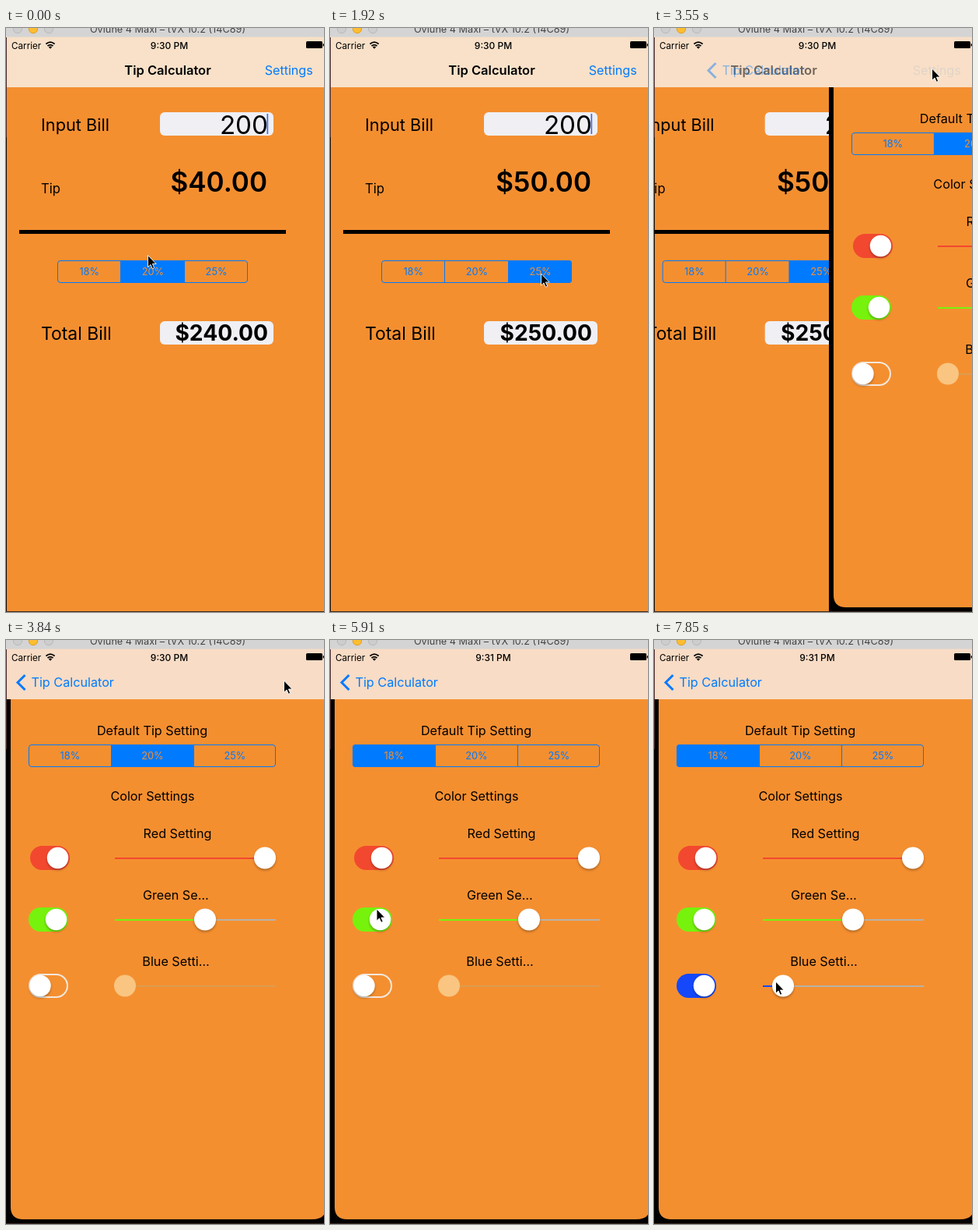
Recreate the animation shown at these times as an HTML page. Size 409x749 px, loop 7990 ms.

```html
<!DOCTYPE html>
<html lang="en">
<head>
<meta charset="utf-8">
<title>Tip Calculator</title>
<style>
  html, body { margin: 0; width: 100%; height: 100%; overflow: hidden; background: #f48f30; }
  svg { display: block; width: 409px; height: 749px; font-family: Inter, Roboto, sans-serif; }
  .raised { filter: drop-shadow(0 2px 1.5px rgba(0, 0, 0, .28)); }
</style>
</head>
<body>
<svg id="stage" viewBox="0 0 409 749"></svg>
<script>
const LOOP = 7990, STEP = 147.9;
const BLUE = '#007aff', ORANGE = '#f48f30';
const stage = document.getElementById('stage');

// Pointer stops: step, x, y
const pointerStops = [
  [0, 182.5, 291.5], [1, 160, 300], [2, 120, 311], [3, 107, 314], [4, 107, 314],
  [5, 125, 314], [7, 235, 314], [8, 264, 314], [9, 271.5, 315], [14, 271.5, 315],
  [15, 280, 280], [17, 335, 80], [18, 348, 46], [19, 356, 51], [20, 357.5, 52],
  [27, 357.5, 52], [28, 320, 72], [30, 160, 130], [31, 108, 140], [32, 91, 143],
  [35, 89.5, 143], [36, 88, 155], [38, 72, 245], [39, 67, 288], [40, 60, 345],
  [42, 48, 436], [44, 44, 451], [48, 44, 451], [50, 115, 444], [51, 144, 439], [53, 156.5, 438]
];

function pointerAt(step) {
  const i = pointerStops.findIndex(s => s[0] >= step);
  const b = pointerStops[i], a = pointerStops[Math.max(0, i - 1)];
  const f = b === a ? 0 : (step - a[0]) / (b[0] - a[0]);
  return [a[1] + (b[1] - a[1]) * f, a[2] + (b[2] - a[2]) * f];
}

const text = (x, y, size, str, { anchor = 'start', weight = 400, fill = '#000' } = {}) =>
  `<text x="${x}" y="${y}" font-size="${size}" text-anchor="${anchor}" font-weight="${weight}" fill="${fill}">${str}</text>`;

const rect = (x, y, w, h, fill, r = 0, extra = '') =>
  `<rect x="${x}" y="${y}" width="${w}" height="${h}" rx="${r}" fill="${fill}" ${extra}/>`;

const circle = (x, y, r, fill, extra = '') =>
  `<circle cx="${x}" cy="${y}" r="${r}" fill="${fill}" ${extra}/>`;

const group = (content, dx = 0, opacity = 1) =>
  `<g transform="translate(${dx})" opacity="${opacity}">${content}</g>`;

function segments(x, y, width, selected, pressed) {
  const w = width / 3, id = `seg${width}`;
  const edge = i => Math.floor(x + w * i);
  let fills = '', lines = '', labels = '';
  ['18%', '20%', '25%'].forEach((label, i) => {
    const left = edge(i), span = edge(i + 1) - left;
    if (i === selected) fills += rect(left, y, span, 29, BLUE);
    else if (i === pressed) fills += rect(left, y, span, 29, '#d68c2c');
    if (i) lines += rect(left, y, 1, 29, BLUE);
    labels += text(x + w * (i + .5) + .4, y + 19, 12.8, label,
      { anchor: 'middle', fill: i === selected ? ORANGE : BLUE });
  });
  return `<clipPath id="${id}">${rect(x, y, width, 29, '#000', 4)}</clipPath>
    <g clip-path="url(#${id})">${fills}${lines}</g>
    ${rect(x + .5, y + .5, width - 1, 28, 'none', 3.5, `stroke="${BLUE}"`)}${labels}`;
}

function toggle(x, y, color, on) {
  const body = on
    ? rect(x, y, 51, 31, color, 15.5)
    : rect(x + 1, y + 1, 49, 29, 'none', 14.5, 'stroke="#f3e8de" stroke-width="2"');
  return body + circle(x + 15 + 20.5 * on, y + 15.5, 13.7, '#fff', 'class="raised"');
}

function slider(y, thumb, color, enabled = true) {
  return rect(140, y - .5, 207, 2, enabled ? '#b7b2aa' : '#dc9c4f')
    + rect(140, y - .5, thumb - 140, 2, color)
    + circle(thumb, y, 14, enabled ? '#fff' : '#f9c581', enabled ? 'class="raised"' : '');
}

function billScreen(step) {
  const selected = step < 4 ? 1 : step < 12 ? 0 : 2;
  const pressed = step === 3 ? 0 : step === 11 ? 2 : -1;
  const tip = 200 * [.18, .2, .25][selected];
  const blink = (step + .5) % 6.75;
  const caretOn = step < 22 && (blink < 1.4 || blink > 4.4);
  const end = { anchor: 'end' };
  return rect(0, 76, 409, 673, ORANGE)
    + text(45, 131.5, 21.7, 'Input Bill')
    + rect(198, 108, 146, 30, '#efeff4', 6)
    + text(337, 135.5, 33.2, '200', end)
    + (caretOn ? rect(335.5, 110, 1.7, 26, '#3b6bf0') : '')
    + text(45, 212, 16.6, 'Tip')
    + text(336, 210, 35, '$' + tip.toFixed(2), { ...end, weight: 600 })
    + rect(17, 259, 343, 5, '#000')
    + segments(66, 298, 245, selected, pressed)
    + text(45, 400, 22.9, 'Total Bill')
    + rect(198, 376, 146, 30, '#efeff4', 6)
    + text(337, 401, 28.2, '$' + (200 + tip).toFixed(2), { ...end, weight: 700 });
}

function settingsScreen(step) {
  const blueOn = step < 47 ? 0 : step === 47 ? .57 : 1;
  const thumb = step < 52 ? 153 : step === 52 ? 160 : 166;
  const middle = { anchor: 'middle' };
  const pressed = step === 33 || step === 34 ? 0 : -1;
  return rect(0, 76, 409, 673, '#000')
    + `<path d="M6 76V727Q6 743 22 743H393Q405 743 409 737V76Z" fill="${ORANGE}"/>`
    + text(188, 122, 16.2, 'Default Tip Setting', middle)
    + segments(29, 134, 318, step < 35 ? 1 : 0, pressed)
    + text(188.5, 206, 16.2, 'Color Settings', middle)
    + text(220.5, 254, 16.2, 'Red Setting', middle)
    + toggle(31, 264, '#f2482f', 1) + slider(279.5, 333, '#f2482f')
    + text(218.3, 333, 16.2, 'Green Se…', middle)
    + toggle(29, 343, '#76f20c', 1) + slider(358.5, 256, '#76f20c')
    + text(218.5, 418, 16.2, 'Blue Setti…', middle)
    + toggle(29, 428, blueOn < 1 ? '#4465f8' : '#1548fb', blueOn)
    + slider(443.5, thumb, blueOn ? '#1548fb' : '#dc9c4f', blueOn > 0);
}

function navBar(step, push) {
  const title = text(208, 60, 16.5, 'Tip Calculator', { anchor: 'middle', weight: 600 });
  const settings = text(394.7, 60, 16.1, 'Settings', { anchor: 'end', fill: step < 21 ? BLUE : '#cbcbcb' });
  const back = `<path d="M24.5 45L15 54.5L24.5 64" fill="none" stroke="${BLUE}" stroke-width="3"/>`
    + text(32.5, 60, 16.2, 'Tip Calculator', { fill: BLUE });
  return rect(0, 11, 409, 65, '#f8e1c8')
    + group(rect(0, 11, 409, 65, '#f8dcc5'), 0, push)
    + group(title, -120 * push, 1 - push)
    + group(settings, 0, 1 - push)
    + group(back, 100 * (1 - push), push);
}

function statusBar(step) {
  const arc = (r, y) => `<path d="M${57 - r} ${y}Q57 ${y - r * .85} ${57 + r} ${y}" fill="none" stroke="#000" stroke-width="1.7"/>`;
  return text(7, 26.5, 11.7, 'Carrier')
    + arc(5.6, 20.5) + arc(3.5, 23) + '<path d="M54.8 24.3Q57 22.6 59.2 24.3L57 26.8Z"/>'
    + text(210, 26.5, 12, step < 28 ? '9:30 PM' : '9:31 PM', { anchor: 'middle', weight: 500 })
    + rect(386, 17, 21, 9, '#000', 1.5) + rect(407.7, 20, 2, 3.5, '#000', 1);
}

function windowFrame() {
  const light = (x, fill, stroke) => circle(x, 1, 5.7, fill, `stroke="${stroke}"`);
  return rect(0, 0, 409, 11.5, '#d4d4d4')
    + light(15, '#cdcdcd', '#b9b9b9') + light(35, '#fdbd31', '#dfa023') + light(55, '#cdcdcd', '#b9b9b9')
    + text(208, 5.7, 12.7, 'Ovlune 4 Maxi – tVX 10.2 (14C89)', { anchor: 'middle', fill: '#444' })
    + rect(0, 12, 1, 128, '#4a2a2c') + rect(0, 140, 1, 609, '#0c0808')
    + rect(0, 748, 409, 1, '#3a2a20');
}

function pointer(step) {
  const [x, y] = pointerAt(step);
  return `<path transform="translate(${x} ${y}) scale(.92)" d="M0 0V16.5L3.8 13L6.3 18.7L8.9 17.6L6.4 12H11.6Z"
    fill="#000" stroke="#fff" stroke-width="1"/>`;
}

function draw(step) {
  const push = step < 24 ? 0 : step === 24 ? .45 : step === 25 ? .88 : 1;
  stage.innerHTML =
    (push < 1 ? group(billScreen(step), -123 * push) : '')
    + (push > 0 ? group(settingsScreen(step), 409 * (1 - push)) : '')
    + navBar(step, push) + statusBar(step) + windowFrame() + pointer(step);
}

let shown = -1;
const start = performance.now();
function tick() {
  const t = (performance.now() - start) % LOOP;
  const step = Math.min(53, Math.floor((t + 6) / STEP));
  if (step !== shown) draw(shown = step);
  requestAnimationFrame(tick);
}
tick();
</script>
</body>
</html>
```
